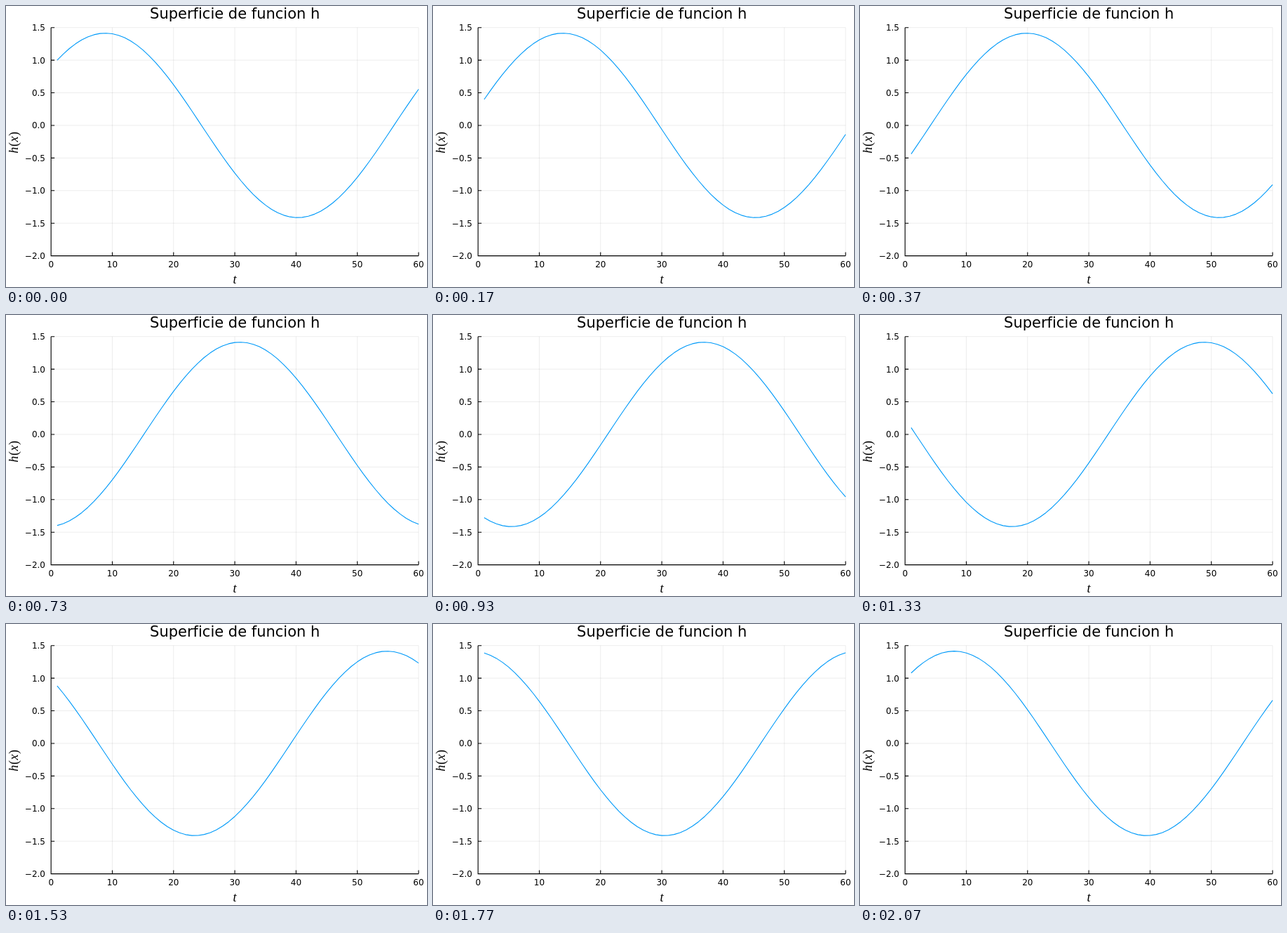
Animation of 600 by 400 pixels, one loop 2110 ms. Source, as an HTML page:

```html
<!DOCTYPE html>
<html lang="es">
<head>
<meta charset="utf-8">
<style>
  html, body { margin: 0; width: 100%; height: 100%; overflow: hidden; background: #fff; }
  svg { display: block; }
  path, polyline { fill: none; }
  text { font: 12px "DejaVu Sans", sans-serif; font-variant-ligatures: none; text-anchor: middle; }
  .title { font-size: 21px; }
  .tick-y { text-anchor: end; }
  .math { font: italic 18px "Liberation Serif", serif; }
  .upright { font-style: normal; }
  #grid { stroke: #000; stroke-opacity: .1; stroke-width: .75; }
  #axes { stroke: #000; stroke-width: 1.1; }
  #curve { stroke: #009af9; stroke-width: 1.1; stroke-linejoin: round; }
</style>
</head>
<body>
<svg id="plot" width="600" height="400" viewBox="0 0 600 400">
  <path id="grid"/>
  <path id="axes"/>
  <polyline id="curve"/>
  <text class="title" x="326.2" y="18">Superficie de funcion h</text>
  <text class="math" x="326" y="394.5">t</text>
  <text class="math" transform="translate(17 194) rotate(-90)" letter-spacing=".6">h<tspan class="upright">(</tspan>x<tspan class="upright">)</tspan></text>
</svg>
<script>
const LOOP = 2110, LAST_STEP = 62;
const LEFT = 64.2, RIGHT = 588, TOP = 30.7, BOTTOM = 355.6, TICK = 5;
const px = t => LEFT + t * (RIGHT - LEFT) / 60;
const py = h => TOP + (1.5 - h) * (BOTTOM - TOP) / 3.5;
const el = id => document.getElementById(id);

function label(text, x, y, cls = "") {
  const node = document.createElementNS("http://www.w3.org/2000/svg", "text");
  node.setAttribute("x", x);
  node.setAttribute("y", y);
  node.setAttribute("class", cls);
  node.textContent = text;
  el("plot").append(node);
}

let grid = "", axes = `M${LEFT} ${TOP}V${BOTTOM}H${RIGHT}`;
for (let t = 0; t <= 60; t += 10) {
  grid += `M${px(t)} ${TOP}V${BOTTOM}`;
  axes += `M${px(t)} ${BOTTOM}v${-TICK}`;
  label(t, px(t), 371.5);
}
for (let h = -2; h <= 1.5; h += 0.5) {
  grid += `M${LEFT} ${py(h)}H${RIGHT}`;
  axes += `M${LEFT} ${py(h)}h${TICK}`;
  label(h.toFixed(1).replace("-", "\u2212"), 56, py(h) + 4.4, "tick-y");
}
el("grid").setAttribute("d", grid);
el("axes").setAttribute("d", axes);

// The wave moves 0.1 rad per step, 30 steps a second, on a 10 ms clock.
function draw(now) {
  const ticks = Math.floor(now % LOOP / 10);
  const step = Math.min(LAST_STEP, Math.floor((ticks + 0.5) * 0.3));
  const points = Array.from({ length: 60 }, (_, i) => {
    const a = (i - step) / 10;
    return `${px(i + 1)},${py(Math.sin(a) + Math.cos(a))}`;
  });
  el("curve").setAttribute("points", points.join(" "));
}

function frame() {
  draw(performance.now());
  requestAnimationFrame(frame);
}
frame();
</script>
</body>
</html>
```
